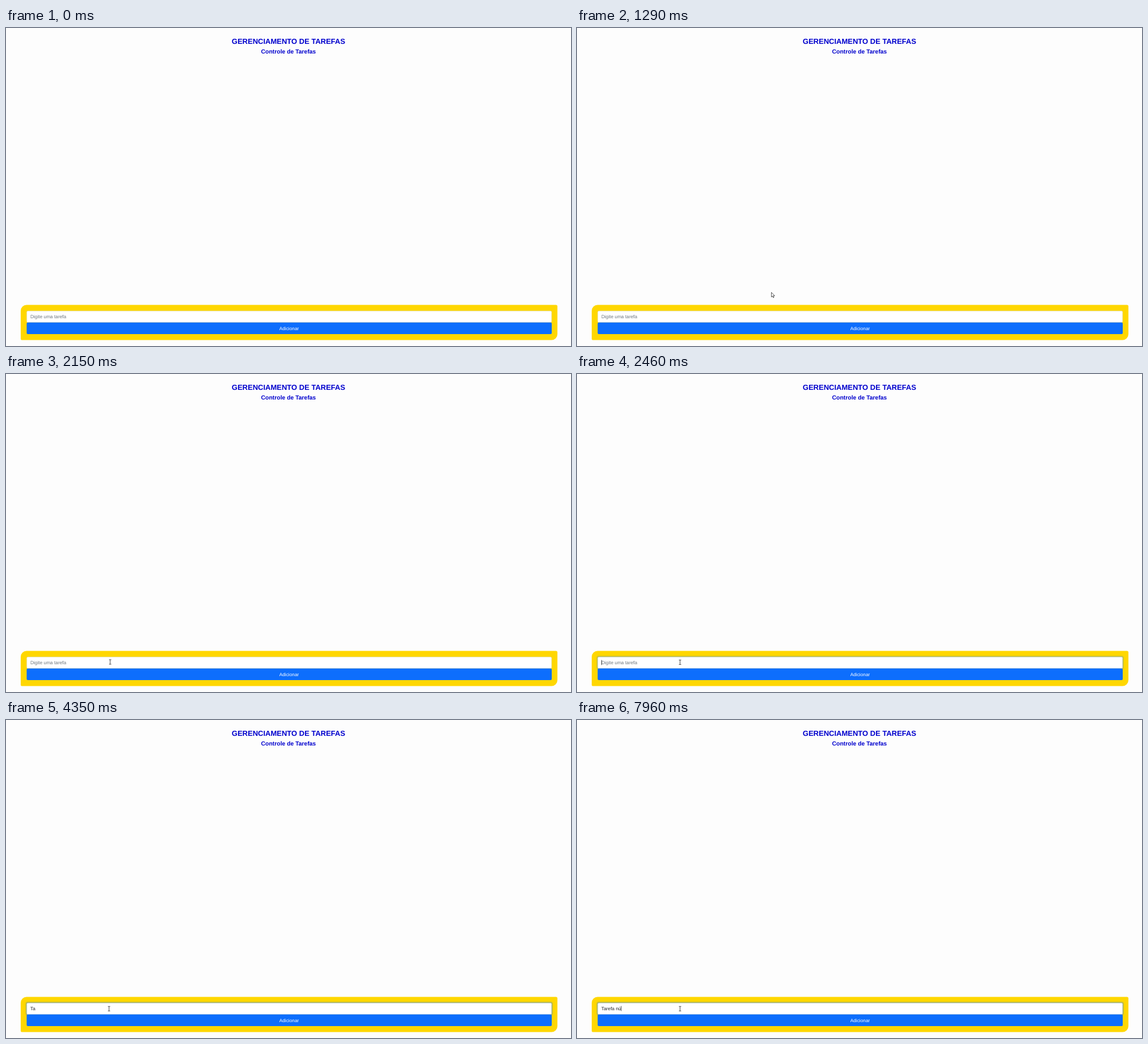
These frames come from a looping animation (998 by 561 pixels, 8000 ms). An HTML page:

```html
<!DOCTYPE html>
<html lang="pt-BR">
<head>
<meta charset="utf-8">
<title>Gerenciamento de Tarefas</title>
<style>
  html, body { margin: 0; width: 100%; height: 100%; overflow: hidden; background: #fdfdfd; }
  svg { display: block; width: 100%; height: 100%; }
  text { font-family: "Liberation Sans", Arial, sans-serif; font-size: 8.32px; white-space: pre; text-rendering: geometricPrecision; }
  .head { font-weight: bold; fill: #0000cd; text-anchor: middle; }
</style>
</head>
<body>
<svg viewBox="0 0 998 561">
  <rect width="998" height="561" fill="#fdfdfd"/>
  <text class="head" x="499" y="28" style="font-size:13px">GERENCIAMENTO DE TAREFAS</text>
  <text class="head" x="499" y="45.2" style="font-size:10.4px">Controle de Tarefas</text>

  <path fill="#ffd700" d="M36.4 488.5H971.4a2.6 2.6 0 0 1 2.6 2.6V540.1a10.4 10.4 0 0 1-10.4 10.4H28.6a2.6 2.6 0 0 1-2.6-2.6V498.9a10.4 10.4 0 0 1 10.4-10.4Z"/>
  <rect id="glow" x="34.4" y="496.9" width="931.6" height="24.6" rx="4" fill="#0d6efd"/>
  <rect id="field" x="36.7" y="499.2" width="927" height="20.2" rx="2" fill="#fff" stroke-width=".52"/>
  <rect x="36.5" y="519.4" width="927.5" height="20.7" rx="2" fill="#0d6efd"/>
  <text x="500" y="532.5" text-anchor="middle" fill="#fff">Adicionar</text>

  <text id="entry" x="43" y="511.8"></text>
  <rect id="caret" y="504.6" width=".8" height="8.8" fill="#212529"/>
  <path id="arrow" d="M.4.4V8.6L2.3 6.9 3.6 9.8 4.9 9.2 3.6 6.4H6.2Z" fill="#fff" stroke="#111" stroke-width=".7"/>
  <path id="beam" d="M-2-4H-.5L0-3.6.5-4H2M0-3.6V3.6M-2 4H-.5L0 3.6.5 4H2" fill="none" stroke="#222" stroke-width=".85"/>
</svg>
<script>
const LOOP = 8000, FOCUS = 2360, TEXT_X = 43;
const $ = id => document.getElementById(id);
const [glow, field, entry, caret, arrow, beam] =
  ["glow", "field", "entry", "caret", "arrow", "beam"].map($);

// Pointer stops: time, x, y
const stops = [
  [520, 150, 245], [650, 452, 142], [790, 452, 142], [1290, 343, 466],
  [1580, 226, 511], [2150, 184, 508], [2400, 182, 508.5], [2850, 182, 509.3]
];
// Time and text after each key press
const keys = [
  [3560, "T"], [3730, "Ta"], [5160, "Tar"], [5300, "Tare"], [5440, "Taref"],
  [5600, "Tarefa"], [7260, "Tarefa "], [7370, "Tarefa n"], [7950, "Tarefa nú"]
];
// Times at which the caret turns on or off
const blinks = [FOCUS, 2850, 3380, 4260, 4790, 6150, 6630, 7170, 7250, 7900, 7950];

const clamp = v => Math.min(1, Math.max(0, v));
const smooth = v => v * v * (3 - 2 * v);
const mix = (a, b, k) => a + (b - a) * k;
const show = (el, on) => el.setAttribute("visibility", on ? "visible" : "hidden");

function pointerAt(t) {
  const i = stops.findIndex(s => s[0] > t);
  if (i < 0) return stops[stops.length - 1].slice(1);
  const a = stops[i - 1], b = stops[i];
  const k = smooth((t - a[0]) / (b[0] - a[0]));
  return [mix(a[1], b[1], k), mix(a[2], b[2], k)];
}

function drawPointer(t) {
  const visible = t >= stops[0][0];
  const [x, y] = visible ? pointerAt(t) : [0, 0];
  const inField = y >= 499;
  show(arrow, visible && !inField);
  show(beam, visible && inField);
  (inField ? beam : arrow).setAttribute("transform", `translate(${x} ${y})`);
}

function drawField(t) {
  const k = smooth(clamp((t - FOCUS) / 150));
  const border = [[206, 134], [212, 183], [218, 254]].map(([a, b]) => Math.round(mix(a, b, k)));
  glow.setAttribute("opacity", 0.25 * k);
  field.setAttribute("stroke", `rgb(${border})`);

  const typed = keys.filter(key => key[0] <= t).map(key => key[1]).pop() || "";
  entry.textContent = typed || "Digite uma tarefa";
  entry.setAttribute("fill", typed ? "#212529" : "#6c757d");
  caret.setAttribute("x", TEXT_X + (typed ? entry.getComputedTextLength() : 0));
  show(caret, blinks.filter(b => b <= t).length % 2);
}

const start = performance.now();
function frame(now) {
  const t = Math.max(0, now - start) % LOOP;
  drawField(t);
  drawPointer(t);
  requestAnimationFrame(frame);
}
frame(start);
</script>
</body>
</html>
```
